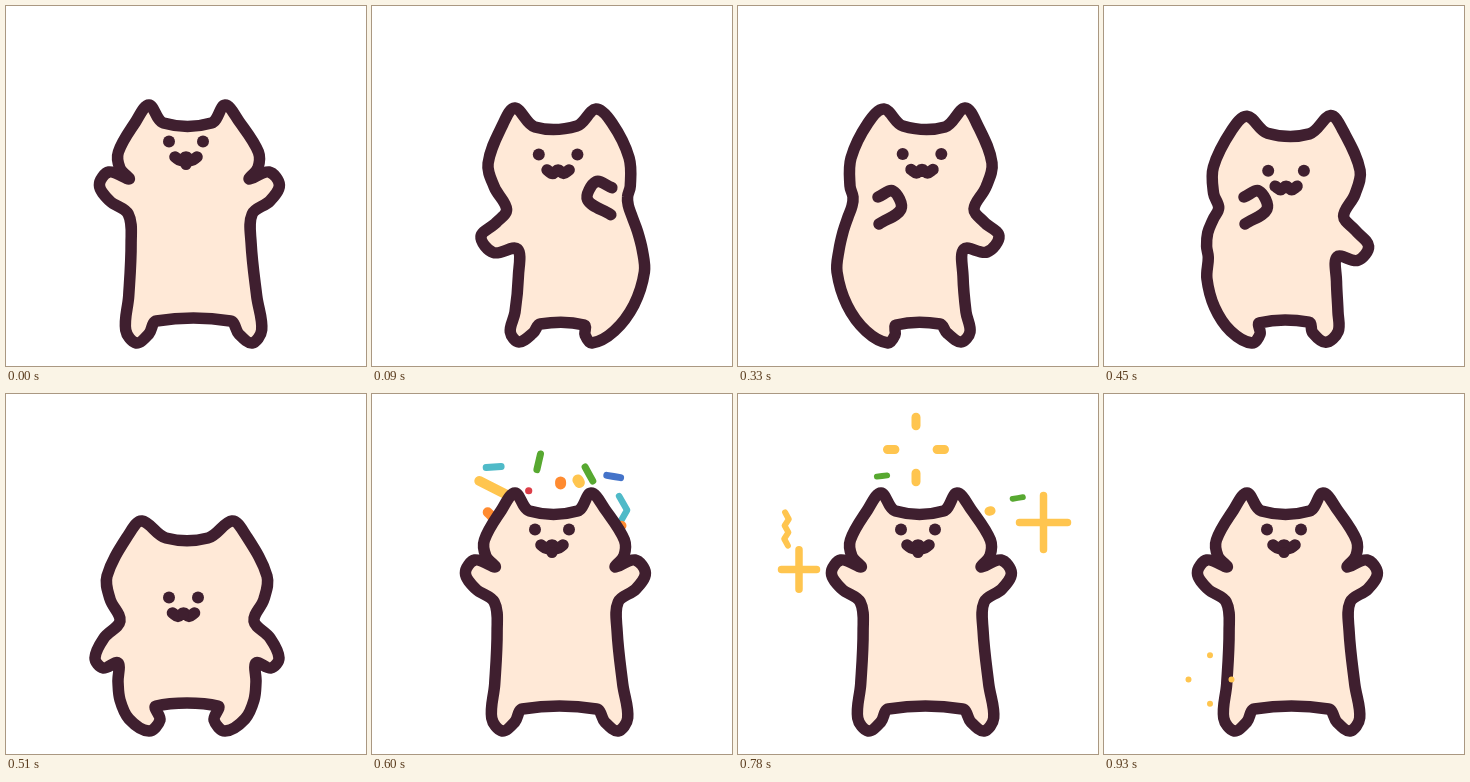
Animation of 360 by 360 pixels, one loop 0.96 s. Source, as an HTML page:

```html
<!DOCTYPE html>
<html lang="en">
<head>
<meta charset="utf-8">
<title>Dancing cat</title>
<style>
html, body { margin: 0; width: 100%; height: 100%; overflow: hidden; background: #fff; }
svg { display: block; width: 100vw; height: 100vh; }
path { stroke-linecap: round; stroke-linejoin: round; }
</style>
</head>
<body>
<svg viewBox="0 0 360 360">
  <g id="confetti"></g>
  <g stroke="#3f1f2f" stroke-width="11.5" fill="none">
    <path id="body" fill="#ffe9d7"/>
    <path id="paw"/>
    <path id="mouth"/>
    <g id="dots" fill="#3f1f2f" stroke="none"><circle r="6"/><circle r="6"/><circle r="5.5"/></g>
  </g>
  <g id="sparkles"></g>
</svg>
<script>
const LOOP = 960, STEP = 30, FLOOR = 340;
const YELLOW = '#ffc54f', ORANGE = '#ff8b30', TEAL = '#4fbac8', GREEN = '#57a830', BLUE = '#4473c9', RED = '#dc3d48';
const $ = id => document.getElementById(id);
const pts = s => s.trim().split(/\s+/).map(p => p.split(',').map(Number));
const n = v => v.toFixed(1);
const clamp = v => Math.max(0, Math.min(1, v));
const mix = (a, b, k) => Array.isArray(a) ? a.map((v, i) => mix(v, b[i], k)) : a + (b - a) * k;

// Half an outline from the ear down to the crotch, mirrored about a leaning axis.
function symmetric(half, lean) {
  const side = s => pts(half).map(([dx, y]) => [181 + lean * (y - 100) + s * dx, y]);
  return [...side(1), ...side(-1).reverse()];
}
const flip = list => list.map(([x, y]) => [370 - x, y]).reverse();

// face: centre x, eye height, half the eye gap, chin drop
const cheer = {
  outline: symmetric(`24,117 38,99 52,116 70,146 69,162 60,173 80,166 90,179
    80,195 62,208 60,237 64,290 68,324 58,337 45,328 37,315`, 0.03),
  face: [180, 135.5, 17, 6]
};
const stretch = {
  outline: cheer.outline.map(([x, y]) => [x, FLOOR + (y - FLOOR) * 1.03]),
  face: [180, 129, 17, 6]
};
const crouch = {
  outline: symmetric(`21,144 45,127 58,140 80,182 77,205 67,227 83,244 92,264
    84,274 69,269 69,288 67,306 58,325 38,337 27,326 31,312`, 0),
  face: [177.5, 203.5, 14.5, 0]
};
const swayLeft = {
  outline: pts(`207,121 227,102 239,118 254,157 248,181 236,203 246,216 261,230
    249,246 226,243 225,270 228,306 232,326 223,336 209,327 202,318
    158,319 157,329 150,337 128,325 109,299 99,266 101,244 105,226
    110,211 114,200 115,191 112,180 113,152 130,117 146,103 165,120`),
  face: [184, 148, 19.3, 0],
  paw: pts('140,191 155,185 163,203 141,218')
};
const swayRight = {
  outline: flip(swayLeft.outline),
  face: [186, 148.5, 19.3, 0],
  paw: flip(swayLeft.paw.map(([x, y]) => [x - 7, y - 9])).reverse()
};

// start time, pose, next pose, share of the next pose
const moves = [
  [0, cheer], [30, cheer, swayRight, 0.45], [60, cheer, swayRight, 0.85],
  [90, swayRight, swayLeft, -0.03], [210, swayRight], [240, swayRight, swayLeft, 0.93],
  [330, swayLeft], [450, swayLeft, crouch, 0.3], [480, swayLeft, crouch, 0.75],
  [510, crouch], [540, stretch], [600, cheer]
];

// Smooth line through the points; handles follow the length of each side.
function curve(p, closed) {
  const len = p.length;
  const at = i => closed ? p[(i + len) % len] : p[Math.max(0, Math.min(len - 1, i))];
  const dist = (a, b) => Math.hypot(b[0] - a[0], b[1] - a[1]);
  let d = 'M' + p[0].map(n);
  for (let i = 0; i < len - (closed ? 0 : 1); i++) {
    const [a, b, c, e] = [at(i - 1), at(i), at(i + 1), at(i + 2)];
    const side = dist(b, c) * 0.36;
    const k1 = side / (dist(a, b) + dist(b, c)), k2 = side / (dist(b, c) + dist(c, e));
    const h1 = b.map((v, j) => n(v + (c[j] - a[j]) * k1));
    const h2 = c.map((v, j) => n(v - (e[j] - b[j]) * k2));
    d += `C${h1} ${h2} ${c.map(n)}`;
  }
  return d + (closed ? 'Z' : '');
}

function drawCat(t) {
  const [, a, b = a, k = 0] = moves.filter(m => m[0] <= t).pop();
  const [x, y, gap, chin] = mix(a.face, b.face, k);
  const paw = a.paw && b.paw ? mix(a.paw, b.paw, k) : (k < 0.5 ? a : b).paw;
  const mouthY = y + 17;
  const mouth = [-2, -1, 0, 1, 2].map(i => [x + i * 5.5, mouthY + (i % 2 ? 2 : -1.5)]);
  $('body').setAttribute('d', curve(mix(a.outline, b.outline, k), true));
  $('paw').setAttribute('d', paw ? curve(paw) : '');
  $('mouth').setAttribute('d', curve(mouth));
  [[x - gap, y], [x + gap, y], [x, mouthY + chin]].forEach(([cx, cy], i) => {
    $('dots').children[i].setAttribute('cx', n(cx));
    $('dots').children[i].setAttribute('cy', n(cy));
  });
}

const line = (d, color, w) => `<path d="${d}" fill="none" stroke="${color}" stroke-width="${n(w)}"/>`;

// Zigzag centred on x, y with the given number of bends.
function zigzag(x, y, angle, length, wiggle = 0, bends = 2) {
  const c = Math.cos(angle * Math.PI / 180), s = Math.sin(angle * Math.PI / 180);
  return 'M' + Array.from({ length: bends + 1 }, (_, i) => {
    const u = (i / bends - 0.5) * length, v = i % 2 ? -wiggle : wiggle;
    return n(x + u * c - v * s) + ' ' + n(y + u * s + v * c);
  }).join('L');
}

// colour, x, y at full spread, angle, length, width, wiggle
const bits = [
  [TEAL, 75, 39.5, -4, 15, 7], [GREEN, 156, 30, -77, 16, 7], [YELLOW, 74, 77, 27, 31, 10],
  [ORANGE, 68, 124.5, 45, 6, 10], [RED, 138, 82, 0, 0.2, 7], [ORANGE, 195.5, 68, 90, 2, 11],
  [YELLOW, 228, 65, 60, 3, 11], [GREEN, 246.5, 52, 61, 16, 7], [BLUE, 291, 56.5, 9, 14, 7],
  [TEAL, 308, 117, 90, 28, 6.5, 4], [ORANGE, 302.5, 146, -20, 3, 10]
];

// Pieces burst from the head, then fall and drift outwards; the outer ones shrink away.
function drawConfetti(t) {
  let out = '';
  if (t >= 600 && t <= 780) {
    const burst = 1 - (1 - clamp((t - 570) / 90)) ** 2;
    const fall = clamp((t - 660) / 120);
    for (const [color, x, y, angle, length, width, wiggle] of bits) {
      const dx = x - 180;
      const size = 1 - fall * (Math.abs(dx) > 80 ? 1 : 0.35);
      if (size < 0.05) continue;
      const px = 180 + dx * (burst + 0.5 * fall);
      const py = mix(115, y, burst) + 52 * fall;
      const turn = angle - Math.sign(dx) * 70 * fall;
      out += line(zigzag(px, py, turn, length * size, wiggle), color, width * (1 + size) / 2);
    }
  }
  if (t >= 750 && t <= 810) out += line(zigzag(48.5, 135 + (t - 780) / 5, 92, 33, 2, 5), YELLOW, 6);
  $('confetti').innerHTML = out;
}

// x, y, radius, start time
const stars = [[178, 55.5, 28.5, 690], [61, 175.5, 17.5, 720], [305.5, 128.5, 24, 720], [106, 285.5, 21.5, 810]];

// A cross grows for three steps, then breaks into four dashes and four dots.
function drawSparkles(t) {
  let out = '';
  for (const [x, y, r, start] of stars) {
    const i = (t - start) / STEP;
    if (i < 0 || i > 4) continue;
    const from = i < 3 ? 0 : 0.74 + 0.26 * (i - 3);
    const to = Math.min(1, (i + 1) * 0.36);
    const end = (dx, dy, k) => n(x + dx * r * k) + ' ' + n(y + dy * r * k);
    const d = [[1, 0], [-1, 0], [0, 1.13], [0, -1.13]]
      .map(([dx, dy]) => `M${end(dx, dy, from)}L${end(dx, dy, to)}`).join('');
    out += line(d, YELLOW, i < 3 ? 7.5 : 9 - 3 * (i - 3));
  }
  $('sparkles').innerHTML = out;
}

const begin = performance.now();
let last = -1;
function draw() {
  const t = Math.floor((performance.now() - begin) % LOOP / STEP) * STEP;
  if (t !== last) {
    last = t;
    drawCat(t);
    drawConfetti(t);
    drawSparkles(t);
  }
  requestAnimationFrame(draw);
}
draw();
</script>
</body>
</html>
```
